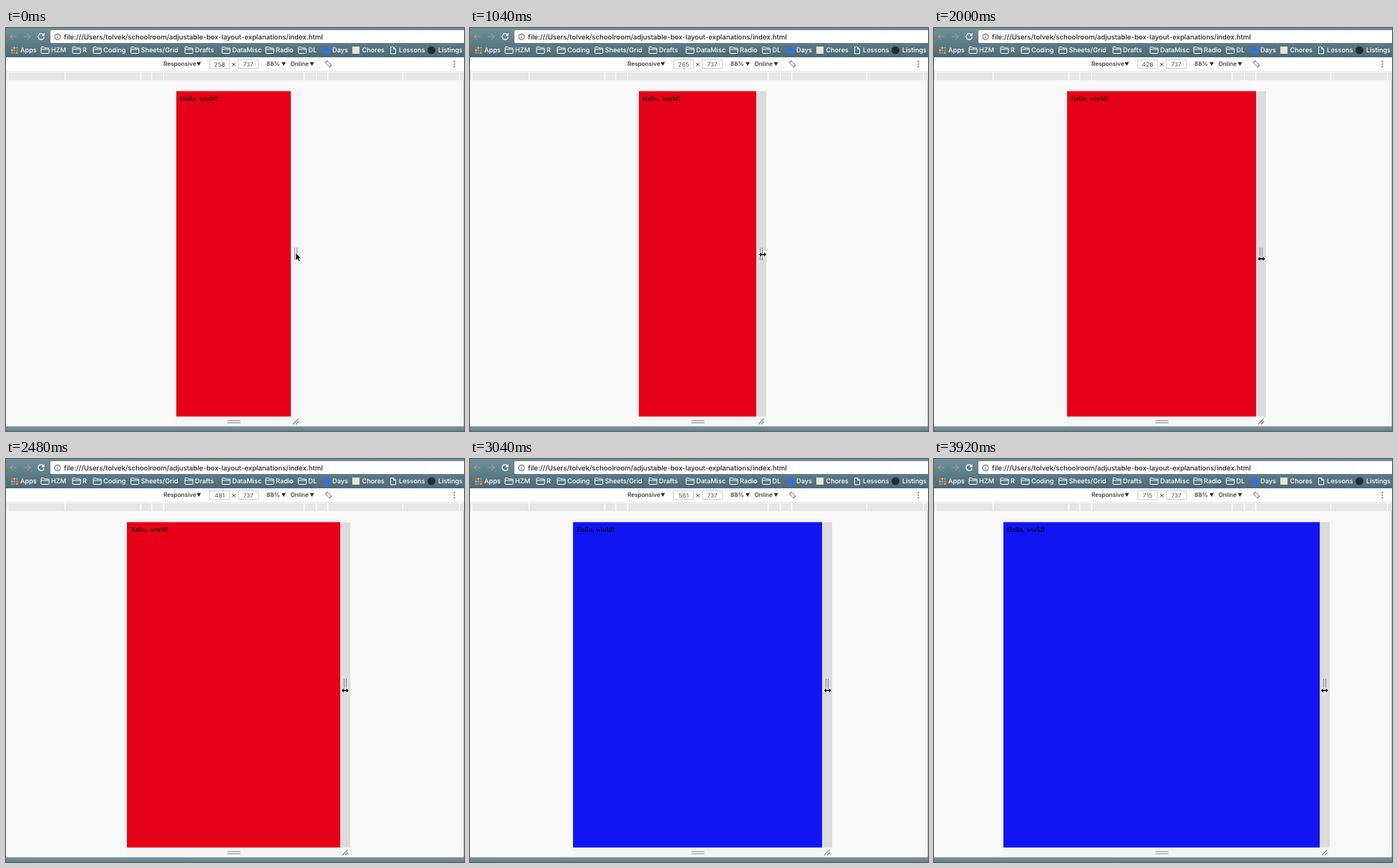
An HTML page that plays this animation: 640 px wide and 564 px high, repeating every 4.24 s.

```html
<!DOCTYPE html>
<html lang="en">
<head>
<meta charset="utf-8">
<title>Resizable viewport</title>
<style>
  html, body { margin: 0; width: 100%; height: 100%; overflow: hidden; background: #f8f8f8; }
  svg { display: block; width: 100vw; height: 100vh; }
  text { font-family: Inter, Roboto, sans-serif; font-weight: 500; white-space: pre; text-rendering: geometricPrecision; }
  .mark { font-size: 9.2px; fill: #fff; }
  .tool { font-size: 8.3px; fill: #2c2c2c; }
  .num { font-size: 8.5px; font-weight: 400; fill: #555; text-anchor: middle; }
  .line { fill: none; stroke: #fff; stroke-width: 1; }
</style>
</head>
<body>
<svg viewBox="0 0 640 564" xmlns="http://www.w3.org/2000/svg">
  <defs>
    <linearGradient id="bar" x2="0" y2="1">
      <stop stop-color="#728d97"/><stop offset="1" stop-color="#4b6b77"/>
    </linearGradient>
    <filter id="soft" x="-10%" y="-10%" width="120%" height="120%"><feGaussianBlur stdDeviation="3"/></filter>
    <path id="folder" class="line" d="M.5 8.6V1.6Q.5.6 1.5.6H4.4L5.6 2H10.6Q11.6 2 11.6 3V8.6Q11.6 9.5 10.6 9.5H1.5Q.5 9.5 .5 8.6ZM.5 3.9H11.6"/>
    <path id="drop" fill="#2c2c2c" d="M-3-2.6H3L0 2.6Z"/>
  </defs>

  <rect width="640" height="564" fill="#f8f8f8"/>
  <rect width="640" height="41" fill="url(#bar)"/>

  <!-- address row -->
  <rect x="62" y="3" width="590" height="18" rx="2" fill="#fff"/>
  <g fill="none" stroke="#8aa1aa" stroke-width="1.2">
    <path d="M15 12H6M10 8L6 12L10 16M25 12H34M30 8L34 12L30 16"/>
    <path stroke="#fff" stroke-width="1.3" d="M52.2 9.2A4.2 4.2 0 1 0 53.2 13"/>
  </g>
  <path fill="#fff" d="M53.6 7V11.2H49.4Z"/>
  <circle cx="72" cy="12.3" r="4" fill="none" stroke="#444" stroke-width=".9"/>
  <path d="M72 11.7V14.6M72 9.8V10.7" stroke="#444" stroke-width="1"/>
  <text x="81" y="15.7" font-size="9.6" fill="#222">file:///Users/tolvek/schoolroom/adjustable-box-layout-explanations/index.html</text>

  <g id="marks"></g>
  <path class="line" d="M537.5 26.5H541.5L544.5 29.5V36H537.5ZM541.5 26.5V29.5H544.5"/>
  <rect x="443" y="26" width="10" height="10" fill="#3b6fd8"/>
  <rect x="484" y="26" width="10" height="10" fill="#e8e5db"/>
  <circle cx="594.5" cy="31" r="5.5" fill="#2b2a33"/>

  <!-- device toolbar -->
  <rect y="41" width="640" height="20" fill="#fff"/>
  <rect y="60" width="640" height="1" fill="#e4e4e4"/>
  <text class="tool" x="220" y="53.3">Responsive</text>
  <text class="tool" x="364" y="53.3">88%</text>
  <text class="tool" x="397.5" y="53.3">Online</text>
  <use href="#drop" x="269.5" y="50.3"/><use href="#drop" x="388" y="50.3"/><use href="#drop" x="427.5" y="50.3"/>
  <g fill="#fff" stroke="#d0d0d0">
    <rect x="284.5" y="44.5" width="28" height="12"/><rect x="324.5" y="44.5" width="28" height="12"/>
  </g>
  <text class="num" id="count" x="298.5" y="53.5"></text>
  <text class="num" x="338.5" y="53.5">737</text>
  <path d="M316 48.9L320.6 53.5M320.6 48.9L316 53.5" stroke="#333"/>
  <g fill="none" stroke="#6b6b6b" stroke-width=".9">
    <rect x="-1.9" y="-3.5" width="3.8" height="7" rx=".6" transform="translate(450.5 50.3) rotate(-45)"/>
    <path d="M446 49.2A4.8 4.8 0 0 1 449.4 45.6M455 51.6A4.8 4.8 0 0 1 451.6 55"/>
  </g>
  <g fill="#555"><circle cx="626.5" cy="46.7" r="1"/><circle cx="626.5" cy="50.5" r="1"/><circle cx="626.5" cy="54.3" r="1"/></g>

  <!-- breakpoint ruler -->
  <rect y="61" width="640" height="12.5" fill="#f8f8f8"/>
  <rect y="62" width="640" height="11" fill="#e6e6e6"/>
  <path d="M2.5 62V73M82.5 62V73M188.5 62V73M203.5 62V73M220.5 62V73M416.5 62V73M433.5 62V73M449.5 62V73M554.5 62V73M633.5 62V73" stroke="#fff" stroke-width="1.4"/>

  <!-- resizable page -->
  <rect id="shade" y="89" height="455" fill="#000" opacity=".1" filter="url(#soft)"/>
  <rect id="foot" y="543.7" height="13.3" fill="#f5f5f5"/>
  <rect id="page" y="88.4" height="455.3"/>
  <text id="hello" y="102.3" font-size="9.9" style="font-family:'Liberation Serif',Times,serif;font-weight:400">Hello, world!</text>
  <g id="edge">
    <rect id="strip" y="88.4" width="14" height="455.3"/>
    <path d="M5.5 307.5V325M8.5 307.5V325" stroke="#858585"/>
    <path d="M3 554.5L10.5 547M7 554.5L11 550.5" stroke="#858585" stroke-width="1.1"/>
  </g>
  <path d="M309.5 549.5H327.5M309.5 552.5H327.5" stroke="#8b8b8b"/>

  <rect x="639" y="73" width="1" height="485" fill="#c3ccd0"/>
  <rect y="557.5" width="640" height="7" fill="#718c97"/>
  <rect y="563" width="640" height="1" fill="#5c7782"/>

  <path id="arrow" d="M0 0V10.2L2.4 8L4.1 11.8L5.8 11L4.2 7.3H7.4Z" fill="#000" stroke="#fff" stroke-width=".7"/>
  <path id="sizer" d="M-5 0L-2-3V-.9H2V-3L5 0L2 3V.9H-2V3Z" fill="#000" stroke="#fff" stroke-width="1.2" paint-order="stroke"/>
</svg>
<script>
const $ = id => document.getElementById(id);
const LOOP = 4240, STEP = 80, LAST = 3920;
const MID = 318, SCALE = 0.619, BREAKPOINT = 500;

function add(parent, tag, attrs, text = '') {
  const el = document.createElementNS('http://www.w3.org/2000/svg', tag);
  for (const key in attrs) el.setAttribute(key, attrs[key]);
  el.textContent = text;
  parent.append(el);
}

function set(id, attrs) {
  for (const key in attrs) $(id).setAttribute(key, attrs[key]);
}

// [label, label x, has folder]
const marks = [
  ['Apps', 20], ['HZM', 63, 1], ['R', 107, 1], ['Coding', 136, 1],
  ['Sheets/Grid', 188.5, 1], ['Drafts', 264, 1], ['DataMisc', 316, 1],
  ['Radio', 377, 1], ['DL', 422.5, 1], ['Days', 456], ['Chores', 497.5],
  ['Lessons', 549], ['Listings', 604]
];
for (const [label, x, folder] of marks) {
  add($('marks'), 'text', { class: 'mark', x, y: 34.3 }, label);
  if (folder) add($('marks'), 'use', { href: '#folder', x: x - 14.5, y: 26 });
}
const dots = ['#e06a5c', '#e8b04c', '#6fb57c'];
for (let i = 0; i < 9; i++) {
  const col = i % 3, row = Math.floor(i / 3);
  add($('marks'), 'rect', {
    x: 7 + col * 3.5, y: 26.5 + row * 3.5, width: 2.5, height: 2.5,
    fill: dots[(col + row) % 3]
  });
}

// [time, viewport width]
const widths = [
  [0, 258], [960, 258], [1040, 265], [1440, 338], [1520, 338], [2000, 426],
  [2480, 481], [2640, 499], [2800, 517], [3360, 619], [3920, 715]
];
// [time, pointer x from page edge, pointer y]
const pointer = [
  [0, 7, 315], [80, 6, 318], [560, 3.5, 314.5], [800, 7.5, 317], [1040, 9, 317],
  [2000, 7.5, 323], [2480, 6.8, 324], [2800, 8, 323.5], [3360, 7.5, 324.5], [3920, 6.8, 324]
];

function at(track, t, k = 1) {
  const i = track.findIndex(p => p[0] > t);
  if (i < 0) return track[track.length - 1][k];
  const a = track[i - 1], b = track[i];
  return a[k] + (b[k] - a[k]) * (t - a[0]) / (b[0] - a[0]);
}

function draw(now) {
  const t = Math.min(LAST, Math.floor(now % LOOP / STEP) * STEP);
  const w = Math.round(at(widths, t));
  const left = Math.round(MID - w * SCALE / 2);
  const right = Math.round(MID + w * SCALE / 2);
  const hover = t >= STEP;

  $('count').textContent = w;
  set('page', { x: left, width: right - left, fill: w >= BREAKPOINT ? '#1015f2' : '#e60018' });
  set('shade', { x: left, width: right - left });
  set('foot', { x: left, width: right - left + 14 });
  set('hello', { x: left + 5 });
  set('edge', { transform: `translate(${right} 0)` });
  set('strip', { fill: hover ? '#dcdcdc' : '#f4f4f4' });

  const spot = `translate(${right + at(pointer, t)} ${at(pointer, t, 2)})`;
  set('arrow', { transform: spot, visibility: hover ? 'hidden' : 'visible' });
  set('sizer', { transform: spot, visibility: hover ? 'visible' : 'hidden' });
}

const start = performance.now();
function tick() {
  draw(performance.now() - start);
  requestAnimationFrame(tick);
}
tick();
</script>
</body>
</html>
```
